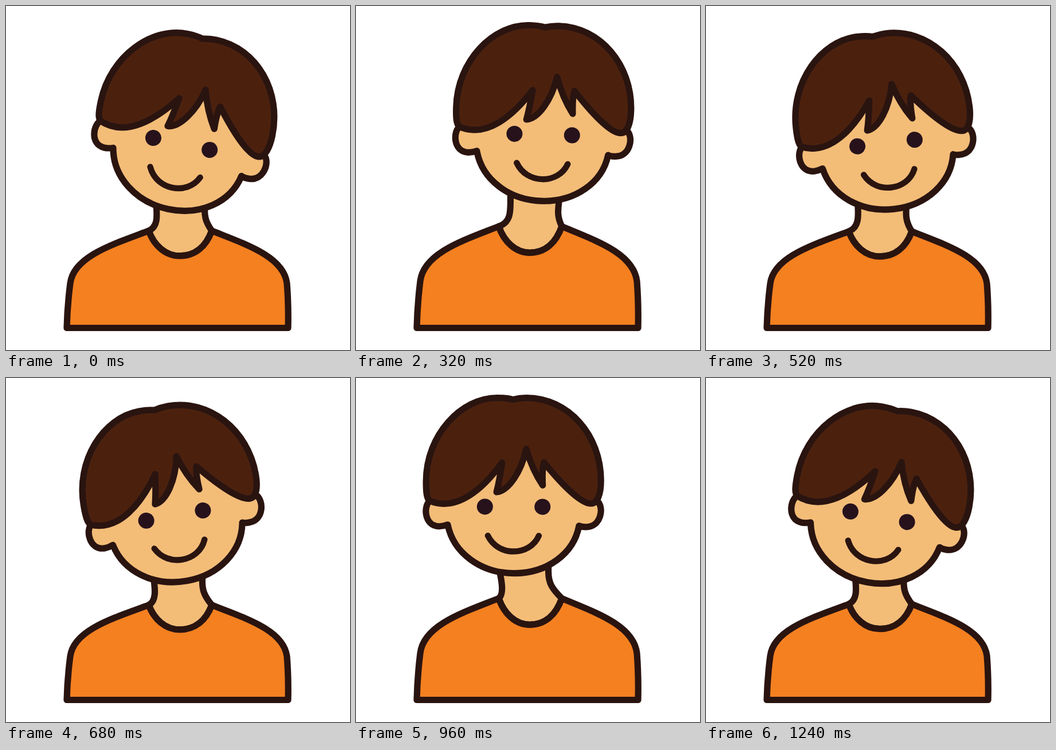
These frames come from a looping animation (600x600 px, 1.28 s). An HTML page:

```html
<!DOCTYPE html>
<html lang="en">
<head>
<meta charset="utf-8">
<title>Swaying head</title>
<style>
  html, body { margin: 0; width: 100%; height: 100%; overflow: hidden; background: #fff; }
  svg { display: block; width: 100%; height: 100%; }
  path { stroke: #2a1410; stroke-width: 11.2; stroke-linecap: round; stroke-linejoin: round; vector-effect: non-scaling-stroke; }
  .skin { fill: #f3bd78; }
  .hair { fill: #4b210e; }
  .shirt { fill: #f48020; }
  .mouth { fill: none; stroke-width: 10.4; }
  circle { fill: #27121c; }
</style>
</head>
<body>
<svg viewBox="0 0 600 600">
  <path id="neck" class="skin"/>
  <!-- The shirt squashes towards its hem -->
  <g id="shirt">
    <path class="shirt" d="M106 0Q107 -41 112 -81.5C118 -131 187 -153 249 -177.5
      C258 -151 278 -131.5 303 -131.5C330 -131.5 349 -149 359 -177.5
      C417 -153 484 -131 490 -81.5Q493 -41 492 0Z"/>
  </g>
  <!-- Head, with the origin between the eyes -->
  <g id="head">
    <path class="skin" d="M-145 -11C-158 -3 -157 34 -130 34.5C-124 34.5 -119 33 -115 31.5
      C-105 81 -57 116 1 116C58 116 105 82 114 33C118 35 121 35 125 35
      C153 36 158 0 146 -10C120 -150 -120 -150 -145 -11Z"/>
    <path class="hair" d="M-147 -10C-98 10 -52 -33 -20.5 -77Q-25 -45 -30 -25.5C-10 -27 13 -60 21.5 -101
      Q32 -65 50.5 -37.5Q49 -65 52.5 -77.5C75 -50 115 -5 135 -6C147 -6 152 -25 152 -46
      C152 -125 95 -190 22 -190Q10 -190 -2 -187Q-13 -190 -29 -190
      C-92 -190 -153 -125 -153 -44C-153 -25 -152 -15 -147 -10Z"/>
    <circle cx="-50.2" r="14"/>
    <circle cx="50.2" r="14"/>
    <path class="mouth" d="M-45 50.5C-36 69 -18 78 0 78C18 78 36 69 44 50.5"/>
  </g>
</svg>
<script>
const LOOP = 1280, STEP = 40, HEM = 561.5;
const { PI, sin, cos } = Math;
const $ = id => document.getElementById(id);

// The swing to the right lasts a little longer than the swing back
function swingPhase(t) {
  const s = (t + 90) % LOOP;
  return s < 680 ? PI * s / 680 : PI + PI * (s - 680) / 600;
}

// The tilt eases to the left, then returns at a steady rate
function tilt(t) {
  const u = 2 * t / LOOP;
  return 12 - 23.7 * (u < 1 ? u ** 1.17 : 2 - u);
}

// The shoulders bob twice per loop, unevenly
function shirtHeight(t) {
  const w = 2 * PI * t / LOOP;
  return .967 - .038 * cos(2 * w + .63 + .61 * cos(w));
}

function neckPath(headX, squash) {
  const y = HEM - 177.5 * squash, dip = y + 46 * squash;
  const left = 260 + .365 * (headX - 300.75), right = left + 85;
  return `M${left} ${y - 80}V${y - 46}
    C${left + (269 - left) * .25} ${y - 26} ${257 + (left - 250) * .68} ${y - 7} 249 ${y}
    C258 ${y + 26.5 * squash} 278 ${dip} 303 ${dip}C330 ${dip} 349 ${y + 28.5 * squash} 359 ${y}
    C${343 + (right - 336) * .44} ${y - 16} ${right + (336 - right) * .15} ${y - 26} ${right} ${y - 46}
    V${y - 80}`;
}

function draw(now) {
  const t = Math.floor(now % LOOP / STEP) * STEP;
  const phase = swingPhase(t), squash = shirtHeight(t);
  const x = 300.75 + 26 * sin(phase - .21);
  const y = 232.8 + 9.5 * cos(2 * phase - .21);
  $('head').setAttribute('transform', `translate(${x} ${y}) rotate(${tilt(t)})`);
  $('shirt').setAttribute('transform', `translate(0 ${HEM}) scale(1 ${squash})`);
  $('neck').setAttribute('d', neckPath(x, squash));
}

const start = performance.now();
function tick() {
  draw(performance.now() - start);
  requestAnimationFrame(tick);
}
tick();
</script>
</body>
</html>
```
